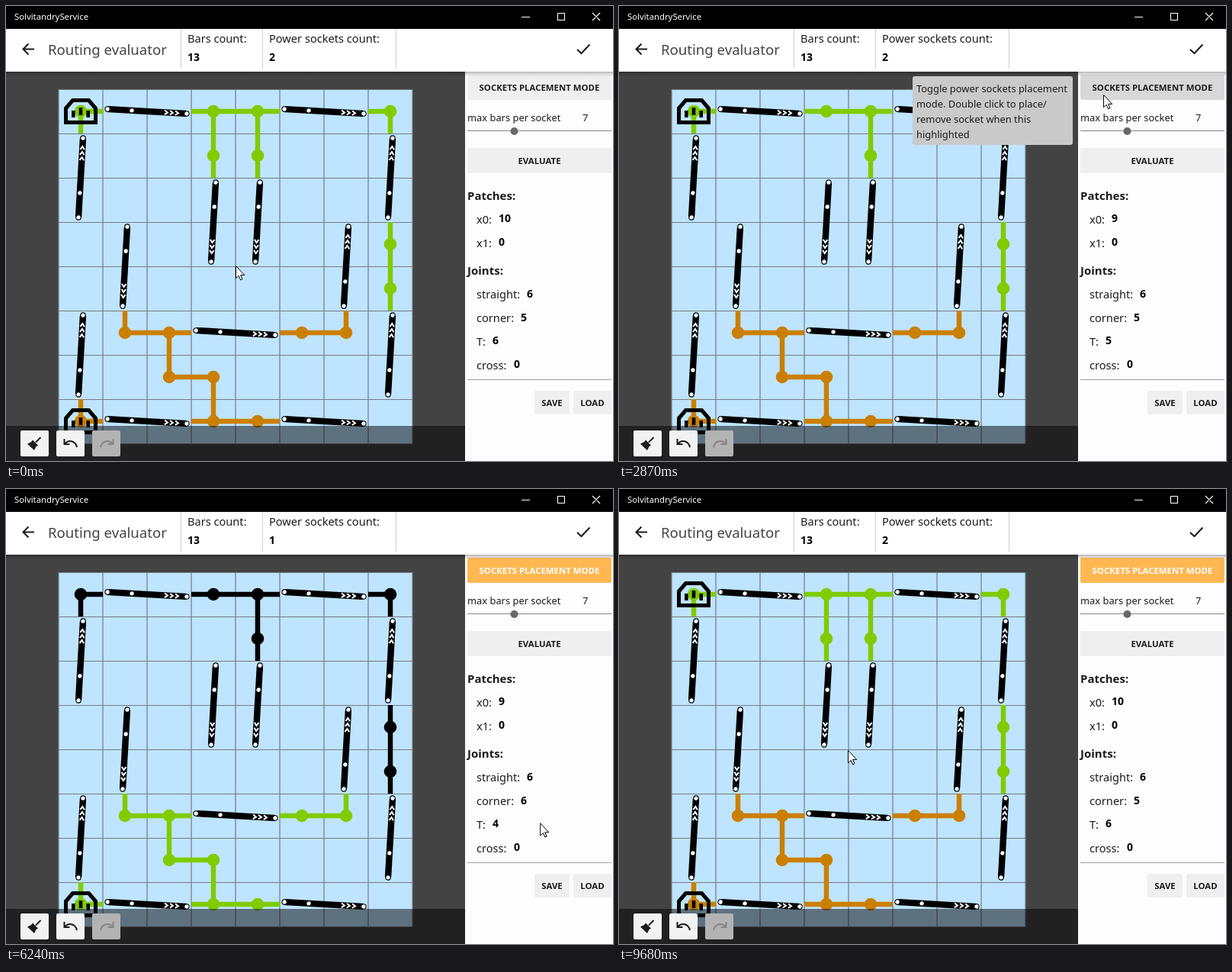
An HTML page that plays this animation: 796x596 px, repeating every 9810 ms.

```html
<!DOCTYPE html>
<html lang="en">
<head>
<meta charset="utf-8">
<title>Routing evaluator</title>
<style>
html, body { margin: 0; width: 100%; height: 100%; overflow: hidden; background: #424342; }
svg { display: block; width: 796px; height: 596px; font-family: "Noto Sans", "Open Sans", sans-serif; fill: #1c1c1c; }
.label { font-size: 14.6px; }
.small { font-size: 12.9px; }
.head { font-size: 15px; font-weight: 700; }
.value { font-size: 14px; font-weight: 700; fill: #000; }
.delta { font-weight: 600; }
.button { font-size: 11.4px; font-weight: 600; text-anchor: middle; }
.line { fill: none; stroke: #1c1c1c; stroke-width: 2; }
.route { fill: none; stroke: currentColor; stroke-width: 6.5; }
.dot { fill: currentColor; }
</style>
</head>
<body>
<svg id="stage" viewBox="0 0 796 596" xmlns="http://www.w3.org/2000/svg"></svg>
<script>
const LOOP = 9810;
const GREEN = '#7fcc00', ORANGE = '#cb7f00', BLACK = '#000';

// Moments at which the app reacts
const REMOVE_PATCH = 1550, TOGGLE_MODE = 3400, REMOVE_SOCKET = 4840, LOAD_SAVED = 8000;
const TOOLTIP = [2870, 3330];
const PRESSES = [[1340, 1410], [1480, 1550], [3330, 3400], [4590, 4680], [4760, 4850], [7720, 7860]];
const DELTA_TIME = 1000;

// Pointer path: time, x, y
const PATH = [
  [0, 301, 340], [540, 301, 340], [1080, 273.5, 195], [1690, 273.5, 195],
  [2320, 480, 150], [2670, 635, 116], [3600, 635, 116], [3940, 380, 127],
  [4220, 134, 143], [4420, 104, 145], [5050, 104, 145], [5600, 380, 215],
  [6100, 663, 364], [6240, 700, 437], [6590, 757, 513], [6920, 757, 513],
  [6990, 759, 513], [8350, 759, 513], [8850, 520, 430], [9400, 307, 349],
  [9680, 300, 342], [LOOP, 300, 342]
];

const rect = (x, y, w, h, fill, extra = '') =>
  `<rect x="${x}" y="${y}" width="${w}" height="${h}" fill="${fill}" ${extra}/>`;
const text = (x, y, cls, str, extra = '') => `<text x="${x}" y="${y}" class="${cls}" ${extra}>${str}</text>`;
const line = (d, extra = '') => `<path class="line" d="${d}" ${extra}/>`;
const route = (d, extra = '') => `<path class="route" d="${d}" ${extra}/>`;
const cell = i => 98 + 58 * i;
const dot = (col, row, extra = '') =>
  `<circle class="dot" cx="${cell(col)}" cy="${cell(row) + 40}" r="8.3" ${extra}/>`;
const dots = list => list.map(([c, r]) => dot(c, r)).join('');
const button = (id, x, y, w, h, label) =>
  rect(x, y, w, h, '#efefef', `rx="2" id="${id}"`) +
  text(x + w / 2, y + h / 2 + 4.5, 'button', label, `id="${id}Label"`);
const value = (id, x, y) =>
  text(x, y, 'value', `<tspan id="${id}"></tspan><tspan id="${id}Delta" class="delta" dx="6.5"></tspan>`);

function grid() {
  let d = '';
  for (let i = 0; i <= 8; i++) {
    const p = 58 * i;
    d += `M${69 + p},109V573M69,${109.5 + p}H533`;
  }
  return rect(69, 109, 464, 464, '#bee4ff') + `<path d="${d}" stroke="#777b7f" stroke-width="1.2"/>`;
}

function bar(x, y, turn) {
  const chevrons = [23, 30, 37].map(p => `M${p},-2.8l4,2.8l-4,2.8`).join('');
  const end = p => `<circle cx="${p}" r="3.2" fill="#fff" stroke="#000" stroke-width="1.1"/>`;
  return `<g transform="translate(${x},${y}) rotate(${turn + 3.3})">` +
    rect(-53, -4.2, 106, 8.4, '#000', 'rx="3"') + end(-52) + end(52) +
    `<circle cx="-20" r="2.7" fill="#fff"/>` +
    `<path d="${chevrons}" fill="none" stroke="#fff" stroke-width="2"/></g>`;
}

const socket = (y, id) => `<g id="${id}" transform="translate(98,${y})">` +
  `<path d="M-19.5,14.5V-4L-10.5,-14.5H10.5L19.5,-4V14.5Z" fill="none" stroke="#000" stroke-width="5"/>` +
  rect(-2.3, -5, 4.6, 10, '#000') + rect(-12, -1, 4.6, 9, '#000') + rect(7.4, -1, 4.6, 9, '#000') + '</g>';

const BARS = [
  [185, 138, 0], [417, 138, 0], [301, 428, 0], [185, 544, 0], [417, 544, 0],
  [98, 225, -90], [504, 225, -90], [98, 457, -90], [504, 457, -90], [446, 341, -90],
  [272, 283, 90], [330, 283, 90], [156, 341, 90]
];

const board = grid() +
  '<g id="upper">' +
  route('M127,138H98V167M243,138H359M330,138V225M475,138H504V167M504,283V399') +
  dots([[0, 0], [3, 0], [4, 0], [4, 1], [7, 0], [7, 3], [7, 4]]) +
  '<g id="patch">' + route('M272,138V225') + dot(3, 1) + '</g></g>' +
  '<g id="lower">' +
  route('M156,399V428H243M214,428V486H272V544M243,544H359M359,428H446V399M98,515V544H127') +
  dots([[1, 5], [2, 5], [5, 5], [6, 5], [2, 6], [3, 6], [3, 7], [4, 7], [0, 7]]) + '</g>' +
  BARS.map(b => bar(...b)).join('') + socket(138, 'upperSocket') + socket(544, 'lowerSocket');

const toolbar = rect(0, 550, 602, 46, '#000', 'opacity=".5"') +
  rect(19, 556, 37, 34, '#f2f2f2', 'rx="2"') + rect(66, 556, 37, 34, '#f2f2f2', 'rx="2"') +
  rect(113, 556, 37, 34, '#b3b3b3', 'rx="2"') +
  line('M45.5,565L39,571.5', 'stroke-width="2.5"') +
  '<path d="M35,568.5L42,575.5L39.5,577L37,582L28,573.5L33,571Z"/>' +
  line('M76.5,567V574H83.5M77,573.5C82,567.5 91,569.5 93,578') +
  line('M140.5,567V574H133.5M140,573.5C135,567.5 126,569.5 124,578', 'style="stroke:#858585"');

const header = rect(0, 0, 796, 30, '#000') +
  text(11, 18, '', 'SolvitandryService', 'font-size="11.3" style="fill:#fff"') +
  line('M676,14.5H687M723.5,9.5H732.5V18.5H723.5ZM769,9L779,19M779,9L769,19', 'style="stroke:#fff;stroke-width:1.1"') +
  rect(0, 30, 796, 56, '#fff') +
  line('M37,56.5H22.5M29.5,49.5L22.5,56.5L29.5,63.5') + line('M749,57L754.5,62L765.5,50.5') +
  text(55, 64, '', 'Routing evaluator', 'font-size="18.6" style="fill:#444"') +
  line('M229.5,30V82M336.5,30V82M511.5,30V82', 'style="stroke:#cfcfcf;stroke-width:1"') +
  text(238, 48, 'label', 'Bars count:') + text(238, 72, 'value', '13') +
  text(345, 48, 'label', 'Power sockets count:') + value('sockets', 345, 72);

const panel = rect(602, 86, 194, 510, '#fdfdfd') +
  button('mode', 605, 90, 189, 33, 'SOCKETS PLACEMENT MODE') +
  text(605, 151, 'small', 'max bars per socket') + text(756, 151, 'small', '7') +
  line('M605,163.5H794', 'style="stroke:#858585;stroke-width:1"') +
  '<circle cx="666.5" cy="164" r="5" fill="#686868"/>' +
  button('evaluate', 605, 186, 189, 33, 'EVALUATE') +
  text(605, 254, 'head', 'Patches:') +
  text(617, 285, 'label', 'x0:') + value('x0', 646, 283) +
  text(617, 316, 'label', 'x1:') + value('x1', 646, 314) +
  text(605, 352, 'head', 'Joints:') +
  text(617, 383, 'label', 'straight:') + value('straight', 683, 382) +
  text(617, 414, 'label', 'corner:') + value('corner', 675, 413) +
  text(617, 445, 'label', 'T:') + value('tee', 638, 443) +
  text(617, 476, 'label', 'cross:') + value('cross', 666, 474) +
  line('M605,489.5H794', 'style="stroke:#a2a2a2;stroke-width:1"') +
  button('save', 693, 504, 46, 31, 'SAVE') + button('load', 744, 504, 50, 31, 'LOAD');

const tooltip = '<g id="tooltip">' + rect(385, 92, 210, 90, '#cacaca', 'rx="3"') +
  ['Toggle power sockets placement', 'mode. Double click to place/', 'remove socket when this', 'highlighted']
    .map((s, i) => text(390, 113 + 20 * i, 'small', s)).join('') + '</g>';

document.getElementById('stage').innerHTML =
  '<defs><linearGradient id="shade" x2="0" y2="1"><stop stop-opacity=".28"/>' +
  '<stop offset="1" stop-opacity="0"/></linearGradient></defs>' +
  rect(0, 86, 602, 510, '#424342') + board + toolbar + panel + header +
  rect(0, 86, 796, 6, 'url(#shade)') + tooltip +
  '<g id="pointer"><circle id="press" r="12" fill="#ffe600" opacity=".6"/>' +
  '<path d="M.5,.5V16.8L4.2,13.3L6.6,18.8L9,17.8L6.6,12.4H11.7Z" fill="#fff" stroke="#000"/></g>';

const el = Object.fromEntries([...document.querySelectorAll('[id]')].map(e => [e.id, e]));
const show = (e, on) => e.setAttribute('display', on ? 'inline' : 'none');
const within = (t, [from, to]) => t >= from && t < to;

// Monotone cubic interpolation along PATH
function pointerAt(t) {
  let i = 0;
  while (i < PATH.length - 2 && t >= PATH[i + 1][0]) i++;
  const h = PATH[i + 1][0] - PATH[i][0], u = (t - PATH[i][0]) / h;
  return [1, 2].map(axis => {
    const slope = k => PATH[k] && PATH[k + 1]
      ? (PATH[k + 1][axis] - PATH[k][axis]) / (PATH[k + 1][0] - PATH[k][0]) : 0;
    const tangent = k => {
      const a = slope(k - 1), b = slope(k);
      return a * b > 0 ? 2 * a * b / (a + b) : 0;
    };
    const p = PATH[i][axis], q = PATH[i + 1][axis], s = u * u * (3 - 2 * u);
    return p + (q - p) * s + h * u * (1 - u) * ((1 - u) * tangent(i) - u * tangent(i + 1));
  });
}

const COUNTS = [
  { at: 0, sockets: 2, x0: 10, x1: 0, straight: 6, corner: 5, tee: 6, cross: 0 },
  { at: REMOVE_PATCH, sockets: 2, x0: 9, x1: 0, straight: 6, corner: 5, tee: 5, cross: 0 },
  { at: REMOVE_SOCKET, sockets: 1, x0: 9, x1: 0, straight: 6, corner: 6, tee: 4, cross: 0 }
];
COUNTS.push({ ...COUNTS[0], at: LOAD_SAVED });

function updateCounts(t) {
  let n = 0;
  while (COUNTS[n + 1] && t >= COUNTS[n + 1].at) n++;
  const now = COUNTS[n], before = COUNTS[n - 1] || now, age = t - now.at;
  const alpha = Math.max(0, Math.min(1, age / 150 + .3, (DELTA_TIME - age) / 150));
  for (const key of Object.keys(now).filter(k => k !== 'at')) {
    const change = now[key] - before[key], delta = el[key + 'Delta'];
    el[key].textContent = now[key];
    delta.textContent = change && alpha ? (change > 0 ? '+' : '-') + Math.abs(change) : '';
    delta.style.fill = change > 0 ? '#359a35' : '#e04448';
    delta.style.fillOpacity = alpha;
  }
}

function hovered(e, x, y) {
  const b = e.getBBox();
  return x >= b.x && x <= b.x + b.width && y >= b.y && y <= b.y + b.height;
}

function draw(t) {
  const [x, y] = pointerAt(t);
  el.pointer.setAttribute('transform', `translate(${x.toFixed(1)},${y.toFixed(1)})`);
  show(el.press, PRESSES.some(p => within(t, p)));
  show(el.tooltip, within(t, TOOLTIP));
  show(el.patch, !within(t, [REMOVE_PATCH, LOAD_SAVED]));

  const unplugged = within(t, [REMOVE_SOCKET, LOAD_SAVED]);
  show(el.upperSocket, !unplugged);
  el.upper.style.color = unplugged ? BLACK : GREEN;
  el.lower.style.color = unplugged ? GREEN : ORANGE;

  for (const id of ['mode', 'evaluate', 'save', 'load'])
    el[id].style.fill = hovered(el[id], x, y) ? '#d8d8d8' : '#efefef';
  const placing = t >= TOGGLE_MODE;
  if (placing) el.mode.style.fill = hovered(el.mode, x, y) ? '#f0ad4b' : '#ffb752';
  el.modeLabel.style.fill = placing ? '#fff' : '#1c1c1c';
  updateCounts(t);
}

const start = performance.now();
function tick() {
  draw((performance.now() - start) % LOOP);
  requestAnimationFrame(tick);
}
tick();
</script>
</body>
</html>
```
